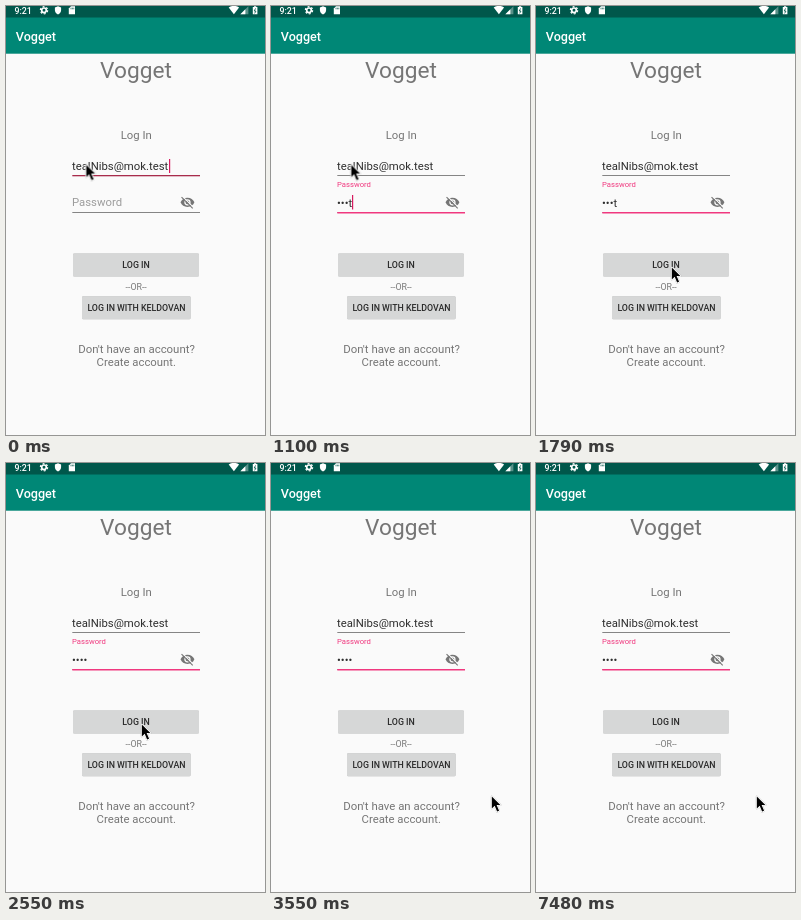
Animation of 259 by 429 pixels, one loop 8000 ms. Source, as an HTML page:

```html
<!DOCTYPE html>
<html lang="en">
<head>
<meta charset="utf-8">
<title>Log in screen</title>
<style>
  html, body { margin: 0; width: 100%; height: 100%; overflow: hidden; background: #fafafa; }
  svg { display: block; }
  #stage { width: 100%; height: 100%; }

  text { font-family: Roboto, "Liberation Sans", sans-serif; font-size: 11.34px; fill: #757575; }
  .mid { text-anchor: middle; }
  .title { font-size: 22.68px; }
  .bar { font-size: 12.6px; font-weight: 500; fill: #fff; }
  .clock { font-size: 8.82px; font-weight: 500; fill: #fff; }
  .btn { font-size: 8.82px; font-weight: 500; fill: #2a2a2a; text-anchor: middle; }
  .small { font-size: 8.82px; }
  .ask { font-size: 11.42px; }
  .ink { fill: #2e2e2e; }
  .key { fill: #d6d7d7; filter: drop-shadow(0 .4px .6px #0004); }

  .anim { animation: 8s step-end infinite; }

  /* focus moves from the first field to the second */
  #mailFocus { animation-name: mailFocus; }
  #mailRest { animation-name: mailRest; }
  #passFocus { animation-name: passFocus; }
  #label { animation-name: label; }
  @keyframes mailFocus { 0% { opacity: 1 } .5%, 100% { opacity: 0 } }
  @keyframes mailRest { 0% { opacity: 0 } .5%, 100% { opacity: 1 } }
  @keyframes passFocus {
    0% { opacity: 0 }
    .5% { opacity: 0; animation-timing-function: steps(4, start) }
    3.17%, 100% { opacity: 1 }
  }
  @keyframes label {
    0% { transform: translate(66px, 200.4px) scale(1); fill: #9c9c9c }
    .5% { transform: translate(66px, 200.4px) scale(1); fill: #9c9c9c; animation-timing-function: steps(4, start) }
    3.17%, 100% { transform: translate(66px, 181.4px) scale(.678); fill: #f0387f }
  }

  /* typing: each character shows briefly, then becomes a dot */
  .typed { visibility: hidden; }
  #p1 { animation-name: p1; }
  #p2 { animation-name: p2; }
  #p3 { animation-name: p3; }
  #p4 { animation-name: p4; }
  #p5 { animation-name: p5; }
  @keyframes p1 { 7.75% { visibility: visible } 10%, 100% { visibility: hidden } }
  @keyframes p2 { 10% { visibility: visible } 11.5%, 100% { visibility: hidden } }
  @keyframes p3 { 11.5% { visibility: visible } 13.75%, 100% { visibility: hidden } }
  @keyframes p4 { 13.75% { visibility: visible } 31.875%, 100% { visibility: hidden } }
  @keyframes p5 { 31.875%, 100% { visibility: visible } }

  #caret { animation-name: caretPlace, caretBlink; }
  @keyframes caretPlace {
    0% { transform: translateX(66px) }
    7.75% { transform: translateX(70px) }
    10% { transform: translateX(76px) }
    11.5% { transform: translateX(79px) }
    13.75%, 100% { transform: translateX(81px) }
  }
  @keyframes caretBlink {
    0%, 6.25%, 20%, 31.875%, 44.375%, 57%, 68.875%, 81.5%, 93.5%, 100% { opacity: 0 }
    .5%, 7.75%, 26.1%, 38.125%, 50.375%, 63%, 75.625%, 88.25% { opacity: 1 }
  }

  /* button press */
  #press { animation-name: press; }
  #ripple { animation-name: ripple; }
  @keyframes press {
    0% { opacity: 0 }
    25.375% { opacity: .06 }
    26.09% { opacity: .1 }
    27.53% { opacity: .05 }
    28.25%, 100% { opacity: 0 }
  }
  @keyframes ripple {
    0% { transform: scale(0); opacity: 0 }
    25.375% { transform: scale(18); opacity: .1 }
    26.09% { transform: scale(38); opacity: .1 }
    26.81% { transform: scale(58); opacity: .08 }
    27.53% { transform: scale(75); opacity: .04 }
    28.25%, 100% { transform: scale(75); opacity: 0 }
  }

  #pointer { animation-name: pointer; filter: drop-shadow(0 .6px .6px #0007); }
  @keyframes pointer {
    0% { transform: translate(79.5px, 157.5px) }
    15.875% { transform: translate(79.5px, 157.5px); animation-timing-function: steps(5, start) }
    19.4875% { transform: translate(132px, 232px); animation-timing-function: steps(5, start) }
    23.1% { transform: translate(135px, 260px) }
    35.625% { transform: translate(135px, 260px); animation-timing-function: steps(5, start) }
    39.22% { transform: translate(194px, 309px); animation-timing-function: steps(4, start) }
    42.09%, 100% { transform: translate(220px, 332px) }
  }
</style>
</head>
<body>
<svg id="stage" viewBox="0 0 259 429" preserveAspectRatio="none">
  <defs>
    <clipPath id="keyClip"><rect x="67" y="247.5" width="126" height="23" rx="1.3"/></clipPath>
  </defs>
  <rect width="259" height="429" fill="#fafafa"/>

  <!-- app bar and status bar -->
  <rect width="259" height="47.7" fill="#008776"/>
  <rect width="259" height="11.5" fill="#00574b"/>
  <text class="clock" x="8.5" y="7.8">9:21</text>
  <g fill="#fff">
    <circle cx="38" cy="4.3" r="2.3" fill="none" stroke="#fff" stroke-width="1.7"/>
    <circle cx="38" cy="4.3" r="3.6" fill="none" stroke="#fff" stroke-width="1.3" stroke-dasharray="1.9 1.87"/>
    <path d="M52 .3l3.1 1.3v2.4c0 2.1-1.3 3.8-3.1 4.4-1.8-.6-3.1-2.3-3.1-4.4V1.6z"/>
    <path d="M65 .3h4v8h-6.2V2.6z"/>
    <path d="M65 1.7v1.6M66.4 1.7v1.6M67.8 1.7v1.6" stroke="#00574b" stroke-width=".7"/>
    <path d="M222.7 1.6q5.2-3.6 10.4 0L227.9 8.3z"/>
    <path d="M242.4 .2v8.1h-8z" opacity=".35"/>
    <path d="M239.4 3.3v5h-5z"/>
    <path d="M248 .2h2.2v.8h1.2v7.3h-4.6V1H248z"/>
    <path d="M249.6 2.4L248.2 5h1.8l-1.4 2.4" fill="none" stroke="#00574b" stroke-width=".8"/>
  </g>
  <text class="bar" x="9.8" y="34.8">Vogget</text>

  <text class="title mid" x="130" y="71.8">Vogget</text>
  <text class="mid" x="130.2" y="133.4">Log In</text>

  <!-- first field -->
  <text class="ink" x="66" y="164.4">tealNibs@mok.test</text>
  <rect id="mailRest" class="anim" x="66.3" y="169" width="127.7" height="1" fill="#858585"/>
  <g id="mailFocus" class="anim" fill="#a82c4c">
    <rect x="66.3" y="169" width="127.7" height="1.3"/>
    <rect x="163" y="153" width="1.2" height="14" fill="#d81b60"/>
  </g>

  <!-- second field -->
  <text id="label" class="anim">Password</text>
  <text id="p1" class="ink typed anim" x="66" y="200.7">t</text>
  <text id="p2" class="ink typed anim" x="66" y="200.7">•e</text>
  <text id="p3" class="ink typed anim" x="66" y="200.7">••s</text>
  <text id="p4" class="ink typed anim" x="66" y="200.7">•••t</text>
  <text id="p5" class="ink typed anim" x="66" y="200.7">••••</text>
  <rect id="caret" class="anim" y="189" width="1.2" height="14.5" fill="#d81b60"/>
  <rect x="66.3" y="206" width="127.7" height="1" fill="#858585"/>
  <rect id="passFocus" class="anim" x="66.3" y="206" width="127.7" height="1.5" fill="#f0387f"/>
  <g transform="translate(173.9 188.8) scale(.63)">
    <path d="M1 12C2.7 7.6 7 4.5 12 4.5s9.3 3.1 11 7.5c-1.7 4.4-6 7.5-11 7.5S2.7 16.4 1 12z" fill="#757575"/>
    <circle cx="12" cy="12" r="4" fill="#757575" stroke="#fafafa" stroke-width="2"/>
    <path d="M4 2.4L21.8 20.2" stroke="#fafafa" stroke-width="1.8"/>
    <path d="M2.6 3.6L20.4 21.4" stroke="#757575" stroke-width="1.8"/>
  </g>

  <!-- buttons -->
  <rect class="key" x="67" y="247.5" width="126" height="23" rx="1.3"/>
  <g clip-path="url(#keyClip)">
    <rect id="press" class="anim" x="67" y="247" width="127" height="24"/>
    <g transform="translate(135 260)"><circle id="ripple" class="anim" r="1"/></g>
  </g>
  <text class="btn" x="130.1" y="262.3">LOG IN</text>
  <text class="small mid" x="130.2" y="283.6">--OR--</text>
  <rect class="key" x="76" y="290.3" width="108.6" height="23" rx="1.3"/>
  <text class="btn" x="130.5" y="305.1">LOG IN WITH KELDOVAN</text>

  <text class="ask mid" x="130.5" y="346.8">Don't have an account?</text>
  <text class="mid" x="130.3" y="360.1">Create account.</text>

  <path id="pointer" class="anim" d="M.8 1.6V13.4L3.7 10.7 6.1 16.6 8.1 15.8 5.6 9.9H9.4z"
        stroke="#fff" stroke-width="1.9" paint-order="stroke" stroke-linejoin="round"/>
</svg>
</body>
</html>
```
